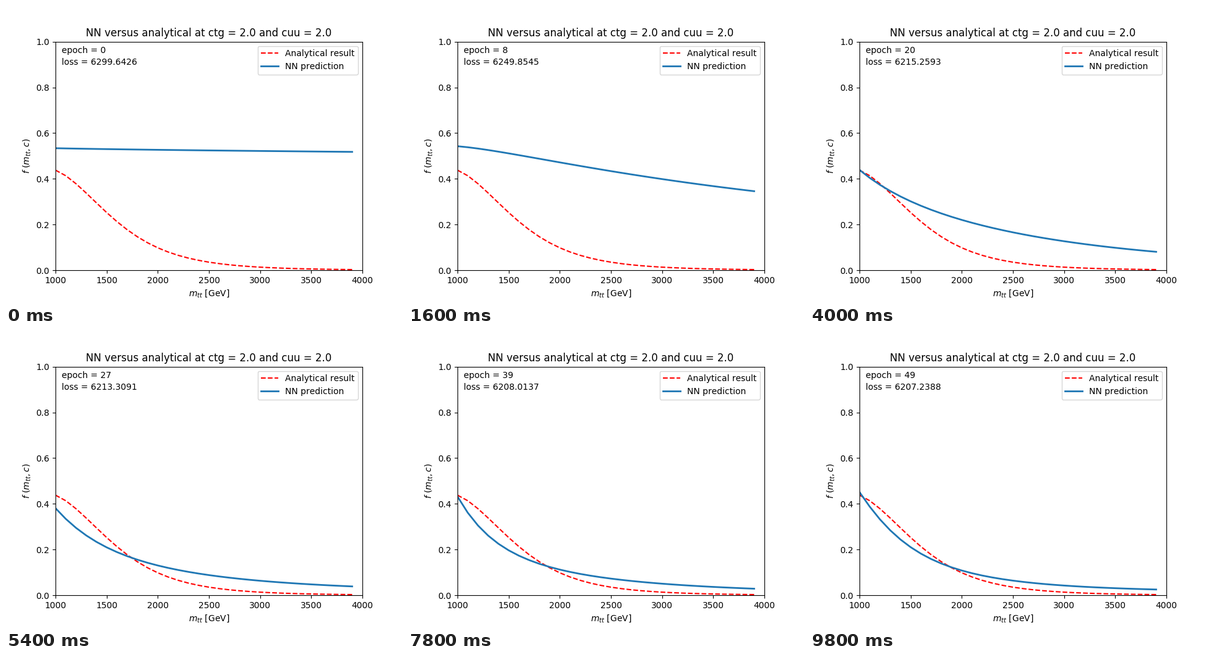
Write a matplotlib script that moves like this. It is 640 by 480 pixels and loops after 10000 ms.

```python
import numpy as np
import matplotlib.pyplot as plt
from matplotlib.animation import FuncAnimation

EPOCHS = 50
INTERVAL = 200

# Round kerning to whole pixels
plt.rcParams["text.kerning_factor"] = 6


def logit(p):
    return np.log(p / (1 - p))


def log_mass(m):
    return np.log(np.asarray(m) / 1000)


def fit_cubic(values):
    """Cubic in log mass for the log-odds at the anchor masses."""
    return np.polyfit(log_mass(ANCHORS), logit(np.asarray(values)), 3)


def curve(coefs):
    return 1 / (1 + np.exp(-np.polyval(coefs, log_mass(mass))))


def smooth(t, knots, values):
    """Cubic Hermite path through the values (numbers or rows) at the knots."""
    slope = np.gradient(values, knots, axis=0, edge_order=2)
    i = np.clip(np.searchsorted(knots, t, side="right") - 1, 0, len(knots) - 2)
    h = knots[i + 1] - knots[i]
    s = (t - knots[i]) / h
    return ((1 + 2 * s) * (1 - s) ** 2 * values[i] + s * (1 - s) ** 2 * h * slope[i]
            + s * s * (3 - 2 * s) * values[i + 1] + s * s * (s - 1) * h * slope[i + 1])


mass = np.arange(1000, 4000, 100)
ANCHORS = [1000, 1300, 2000, 3900]
EXACT = [.438, .338, .0985, .0033]

# Training stages: epoch, loss, prediction at the anchor masses
STAGES = [
    (0, 6299.6426, [.534, .5315, .527, .518]),
    (8, 6249.8545, [.5427, .526, .472, .346]),
    (13, 6229.0884, [.516, .472, .371, .217]),
    (20, 6215.2593, [.439, .347, .2205, .081]),
    (27, 6213.3091, [.381, .262, .1305, .039]),
    (39, 6208.0137, [.432, .261, .1125, .029]),
    (49, 6207.2388, [.4515, .2845, .1085, .0255]),
]
epochs = np.array([epoch for epoch, _, _ in STAGES])
losses = np.array([loss for _, loss, _ in STAGES])
fits = np.array([fit_cubic(values) for _, _, values in STAGES])


def prediction(epoch):
    return curve(smooth(epoch, epochs, fits))


fig, ax = plt.subplots(figsize=(6.4, 4.8), dpi=100)
ax.plot(mass, curve(fit_cubic(EXACT)), "r--", lw=1.5, label="Analytical result")
fit_line, = ax.plot(mass, prediction(0), color="C0", lw=2, label="NN prediction")
ax.set_xlim(1000, 4000)
ax.set_ylim(0, 1)
ax.set_xlabel(r"$m_{tt}$ [GeV]")
ax.set_ylabel(r"$f\ (m_{tt}, c)$")
ax.set_title("NN versus analytical at ctg = 2.0 and cuu = 2.0")
ax.legend(loc="upper right")
epoch_text = ax.text(0.02, 0.95, "", transform=ax.transAxes)
loss_text = ax.text(0.02, 0.90, "", transform=ax.transAxes)


def update(epoch):
    fit_line.set_ydata(prediction(epoch))
    epoch_text.set_text(f"epoch = {epoch}")
    loss_text.set_text(f"loss = {smooth(epoch, epochs, losses):.4f}")
    return fit_line, epoch_text, loss_text


anim = FuncAnimation(fig, update, frames=EPOCHS, interval=INTERVAL,
                     repeat=True, repeat_delay=0, blit=False)
plt.show()
```
